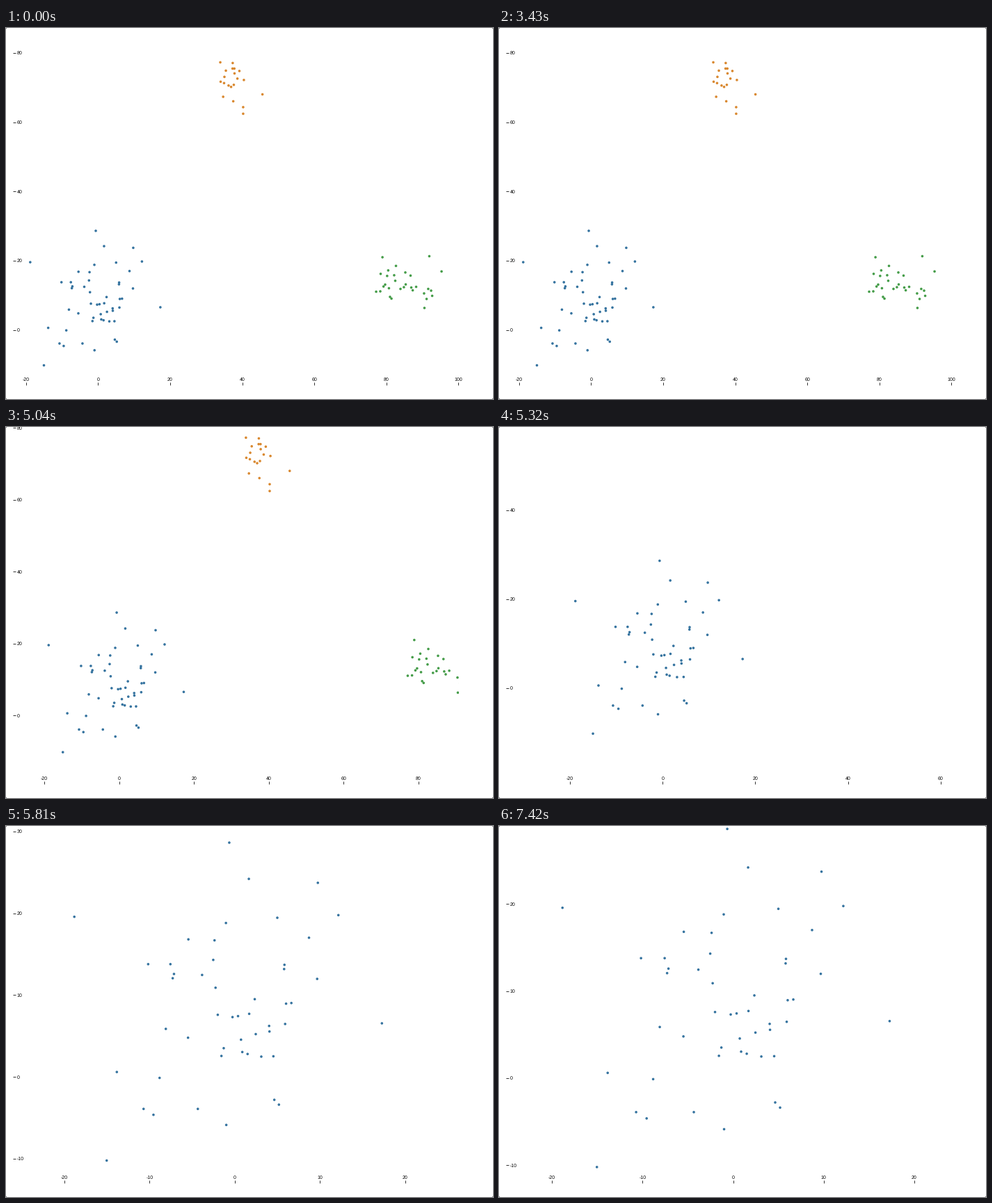
Animation, 700 px wide and 534 px high, one loop 8 s. Source, as a matplotlib script:

```python
import math

import numpy as np
import matplotlib.pyplot as plt
from matplotlib.animation import FuncAnimation
from matplotlib.collections import LineCollection
from matplotlib.patches import Rectangle

plt.rcParams["font.family"] = "Liberation Sans"
plt.rcParams["text.hinting"] = "none"

W, H, DPI = 700, 534, 100
PX = 72 / DPI
PLOT_W, PLOT_H = 650.5, 504
FRAMES, INTERVAL = 400, 20
STEP = 70

# Opening view: pixel of the data origin and pixels per unit
ORIGIN = np.array([132.4, 434.6])
UNIT = np.array([5.18, -4.983])

# Zoom: centre of the view in opening pixels, and final magnification
CENTRE = np.array([325.0, 252.0])
TARGET = np.array([127.8, 390.5])
ZOOM = 2.514
ZOOM_START, ZOOM_TIME = 4563, 1618

BLUE = [
    (-0.65, 28.63), (1.65, 24.2), (9.75, 23.72), (-18.84, 19.57), (4.99, 19.45),
    (12.16, 19.77), (-1.04, 18.81), (-5.45, 16.81), (-2.38, 16.69), (8.71, 17.01),
    (-10.17, 13.78), (-7.56, 13.78), (-2.53, 14.3), (5.83, 13.7), (5.79, 13.18),
    (-7.14, 12.58), (-7.29, 12.06), (-3.84, 12.46), (9.67, 11.98), (-2.26, 10.9),
    (2.34, 9.5), (6.02, 8.95), (6.64, 9.03), (-2.0, 7.59), (-0.27, 7.31),
    (0.38, 7.43), (1.69, 7.71), (4.03, 6.23), (4.07, 5.55), (5.91, 6.47),
    (2.46, 5.23), (-8.1, 5.87), (-5.49, 4.79), (0.73, 4.55), (-1.3, 3.51),
    (-1.57, 2.56), (0.88, 3.04), (1.5, 2.8), (3.11, 2.48), (4.53, 2.52),
    (17.27, 6.55), (-13.85, 0.6), (-8.83, -0.12), (4.64, -2.8), (5.18, -3.39),
    (-10.71, -3.91), (-9.55, -4.63), (-4.34, -3.91), (-1.0, -5.87), (-15.04, -10.22),
]
ORANGE = [
    (33.9, 77.3), (37.35, 77.1), (35.45, 74.9), (37.3, 75.5), (37.8, 75.5),
    (39.2, 74.8), (37.85, 74.1), (35.05, 73.1), (38.65, 72.6), (40.45, 72.2),
    (34.0, 71.7), (34.95, 71.3), (36.2, 70.6), (36.9, 70.2), (37.65, 70.8),
    (45.6, 68.05), (34.7, 67.35), (37.5, 66.05), (40.25, 64.35), (40.25, 62.45),
]
GREEN = [
    (78.9, 21.0), (91.9, 21.3), (82.65, 18.5), (80.5, 17.2), (78.4, 16.2),
    (80.2, 15.6), (82.15, 15.8), (85.25, 16.6), (86.7, 15.7), (95.3, 16.9),
    (82.45, 14.2), (79.65, 13.1), (79.2, 12.55), (80.7, 12.05), (77.15, 11.05),
    (78.3, 11.15), (81.0, 9.55), (81.4, 9.05), (83.9, 11.85), (84.85, 12.35),
    (85.35, 13.15), (86.9, 12.25), (87.3, 11.45), (88.25, 12.45), (91.6, 11.85),
    (92.4, 11.35), (90.45, 10.55), (92.7, 9.85), (91.15, 8.95), (90.55, 6.35),
]
GROUPS = [(BLUE, "#35739f"), (ORANGE, "#d9882f"), (GREEN, "#449c48")]
POINTS = np.array([p for pts, _ in GROUPS for p in pts])
COLORS = [c for pts, c in GROUPS for _ in pts]


def ease_cubic(p):
    return 4 * p**3 if p < 0.5 else 1 - 4 * (1 - p) ** 3


def smooth_zoom(q):
    """Van Wijk zoom: share of the pan done and magnification at q."""
    rho = math.sqrt(2)
    w0, w1 = 650.0, 650.0 / ZOOM
    d = math.dist(CENTRE, TARGET)
    diff, bend = w1**2 - w0**2, 4 * d * d
    r0 = math.asinh(-(diff + bend) / (4 * w0 * d))
    r1 = math.asinh(-(diff - bend) / (4 * w1 * d))
    r = r0 + (r1 - r0) * q
    pan = w0 / (rho**2 * d) * (math.cosh(r0) * math.tanh(r) - math.sinh(r0))
    return pan, math.cosh(r) / math.cosh(r0)


def view(ms):
    """Pixel of the data origin and pixels per unit at a time."""
    p = min(max((ms - ZOOM_START) / ZOOM_TIME, 0), 1)
    pan, k = smooth_zoom(ease_cubic(p))
    middle = CENTRE + (TARGET - CENTRE) * pan
    return CENTRE + k * (ORIGIN - middle), UNIT * k


def ticks(lo, hi, count=5):
    raw = (hi - lo) / count
    base = 10 ** math.floor(math.log10(raw))
    err = raw / base
    step = base * (10 if err >= math.sqrt(50) else 5 if err >= math.sqrt(10)
                   else 2 if err >= math.sqrt(2) else 1)
    first, last = math.ceil(lo / step), math.floor(hi / step)
    return [round(n * step) for n in range(first, last + 1)]


fig = plt.figure(figsize=(W / DPI, H / DPI), dpi=DPI, facecolor="white")
ax = fig.add_axes([0, 0, 1, 1])
ax.set_xlim(0, W)
ax.set_ylim(H, 0)
ax.axis("off")

dots = ax.scatter(POINTS[:, 0], POINTS[:, 1], s=(3.6 * PX) ** 2, c=COLORS, linewidths=0)
dots.set_clip_path(Rectangle((0, 0), PLOT_W, PLOT_H, transform=ax.transData))
marks = LineCollection([], colors="black", linewidths=0.8 * PX)
ax.add_collection(marks, autolim=False)


def label_pool(align):
    return [ax.text(0, 0, "", fontsize=7 * PX, ha=align, va="baseline", color="black")
            for _ in range(10)]


x_labels, y_labels = label_pool("center"), label_pool("left")

# Window corners
for cx in (0, W - 1):
    for cy in (0, H - 1):
        ax.add_patch(Rectangle((cx, cy), 1, 1, fc="#777777", lw=0))


def set_labels(pool, items):
    for label in pool:
        label.set_text("")
    for label, (x, y, value) in zip(pool, items):
        label.set_position((x, y))
        label.set_text(str(value))


def update(i):
    ms = (i * INTERVAL + INTERVAL // 2) // STEP * STEP
    (x0, y0), (sx, sy) = view(ms)
    dots.set_offsets(POINTS * (sx, sy) + (x0, y0))

    xs = [(x0 + v * sx, v) for v in ticks(-x0 / sx, (PLOT_W - x0) / sx)]
    ys = [(y0 + v * sy, v) for v in ticks((PLOT_H - y0) / sy, -y0 / sy)]
    marks.set_segments([[(x, 510), (x, 514.2)] for x, _ in xs]
                       + [[(9.6, y), (13.8, y)] for y, _ in ys])
    set_labels(x_labels, [(x, 508.3, v) for x, v in xs])
    set_labels(y_labels, [(15.4, y + 2.3, v) for y, v in ys])
    return [dots, marks, *x_labels, *y_labels]


anim = FuncAnimation(fig, update, frames=FRAMES, interval=INTERVAL,
                     repeat=True, repeat_delay=0, blit=False)
plt.show()
```
